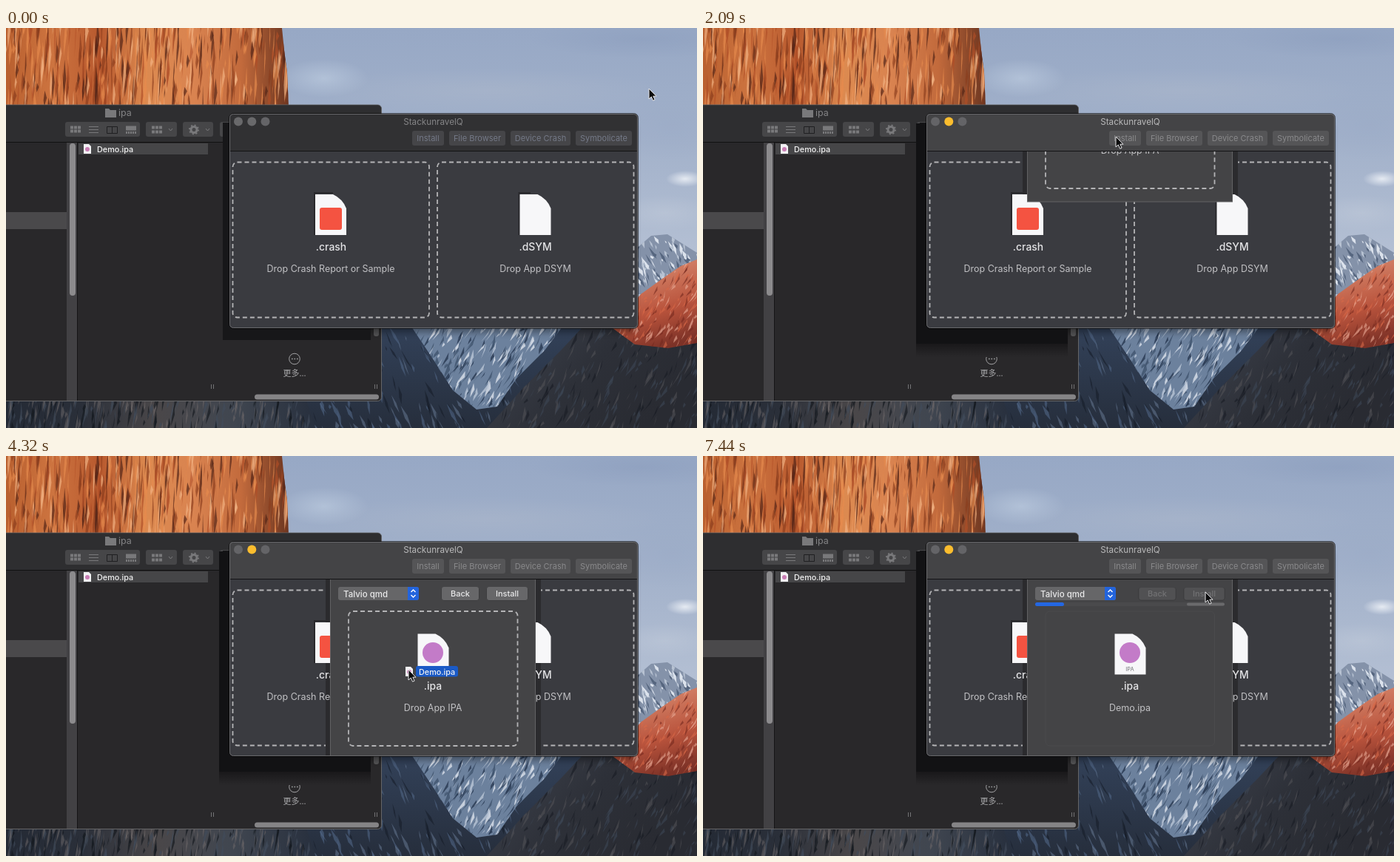
These frames come from a looping animation (934 by 541 pixels, 8000 ms). An HTML page with a canvas:

```html
<!DOCTYPE html>
<html lang="en">
<head>
<meta charset="utf-8">
<title>Install an app package</title>
<style>
html, body { margin: 0; width: 100%; height: 100%; overflow: hidden; background: #2b3444; }
canvas, svg { position: absolute; left: 0; top: 0; width: 934px; height: 541px; }
text { font: 400 12.5px Inter, "Noto Sans", sans-serif; fill: #c0c0c3; }
.mid { text-anchor: middle; }
.name { font-size: 13.9px; font-weight: 500; fill: #e4e4e6; }
.file { font-size: 10.8px; font-weight: 500; fill: #f2f2f2; }
.small { font-size: 11px; font-weight: 500; fill: #e9e9ea; }
.dash { fill: none; stroke: #b4b4b6; stroke-width: 1.8; stroke-dasharray: 6 4; }
.paper { fill: #f7f7f9; }
.segment { fill: #464648; }

/* One clock for everything: 8 s, hard steps, 1% = 80 ms */
.anim, .bar rect, .bar text { animation: 8s step-end infinite; }
.bar rect { fill: #454548; animation-name: button; }
.bar rect.press { animation-name: press; }
.bar text { font-size: 11px; fill: #747987; animation-name: label; }
.title { font-size: 11.7px; fill: #858587; animation-name: title; }
.head { fill: #313133; animation-name: head; }
.red { fill: #69696b; animation-name: red; }
.yellow { fill: #69696b; animation-name: yellow; }
.focus { opacity: 0; animation-name: focus; }
.sheet { transform: translateY(-245px); animation-name: sheet; }
.ring { opacity: 0; animation-name: ring; }
.ghost { opacity: 0; animation-name: ghost; }
.empty { animation-name: empty; }
.loaded { opacity: 0; animation-name: loaded; }
.work { opacity: 0; animation-name: work; }
.ready { animation-name: ready; }
.fill { width: 0; animation-name: fill; }
.cursor { animation-name: cursor; }

@keyframes button { 20.5% { fill: #656567; } 26.125% { fill: #555557; } }
@keyframes press { 20.5% { fill: #656567; } 22.375% { fill: #858587; } 26.125% { fill: #555557; } }
@keyframes label { 20.5% { fill: #e4e4e5; } 26.125% { fill: #89898b; } }
@keyframes title { 20.5% { fill: #b9b9ba; } }
@keyframes head { 20.5% { fill: #3f3f41; } 26.125% { fill: #444446; } }
@keyframes red { 20.5% { fill: #fb5b50; } 26.125% { fill: #646467; } }
@keyframes yellow { 20.5% { fill: #fbbd2e; } }
@keyframes focus { 20.5% { opacity: 1; } }
@keyframes sheet {
  26.125% { transform: translateY(-175px); }
  28% { transform: translateY(-60px); }
  29.75% { transform: none; }
}
@keyframes ring { 44.75% { opacity: 1; } 50.25% { opacity: 0; } }
@keyframes ghost {
  44.75% { opacity: 1; transform: none; }
  50.25% { opacity: 1; transform: translate(284px, 50px); }
  52% { opacity: 1; transform: translate(358px, 94px); }
  53.875% { opacity: 1; transform: translate(408px, 124px); }
  55.75% { opacity: 1; transform: translate(432px, 135px); }
  57.625% { opacity: 0; }
}
@keyframes empty { 57.625% { opacity: 0; } }
@keyframes loaded { 57.625% { opacity: 1; } }
@keyframes work { 83.75% { opacity: 1; } }
@keyframes ready { 83.75% { opacity: .25; } }
@keyframes fill {
  85.5% { width: 8px; }
  87.375% { width: 16px; }
  89.25% { width: 24px; }
  91.125% { width: 32px; }
  93% { width: 39px; }
}
@keyframes cursor {
  0% { transform: translate(869px, 82px); }
  1.875% { transform: translate(868px, 84px); }
  3.75% { transform: translate(865px, 88px); }
  7.5% { transform: translate(822px, 105px); }
  9.25% { transform: translate(722px, 126px); }
  11.125% { transform: translate(608px, 142px); }
  13% { transform: translate(541px, 147px); }
  14.875% { transform: translate(541px, 149px); }
  16.75% { transform: translate(550px, 148px); }
  18.625% { transform: translate(558px, 147px); }
  33.5% { transform: translate(536px, 150px); }
  35.25% { transform: translate(430px, 158px); }
  37.125% { transform: translate(290px, 162px); }
  39.125% { transform: translate(182px, 164px); }
  41% { transform: translate(140px, 163px); }
  44.75% { transform: translate(136px, 165px); }
  46.625% { transform: translate(343px, 178px); }
  50.25% { transform: translate(420px, 215px); }
  52% { transform: translate(494px, 259px); }
  53.875% { transform: translate(544px, 289px); }
  55.75% { transform: translate(568px, 300px); }
  57.625% { transform: translate(572px, 300px); }
  59.5% { transform: translate(610px, 284px); }
  63.25% { transform: translate(685px, 229px); }
  65% { transform: translate(687px, 216px); }
  66.875% { transform: translate(685px, 202px); }
  68.75% { transform: translate(682px, 191px); }
  70.625% { transform: translate(679px, 184px); }
}
</style>
</head>
<body>
<canvas width="934" height="541"></canvas>
<svg viewBox="0 0 934 541">
  <defs>
    <path id="paper" class="paper" d="M0 0H24Q37 6 42 19V55H0Z"/>
    <g id="file">
      <path fill="#f2f2f4" d="M0 0H7L10 3V13H0Z"/>
      <circle cx="5" cy="7" r="3" fill="#c87db4"/>
    </g>
    <clipPath id="body"><rect x="302" y="167" width="552" height="238"/></clipPath>
    <clipPath id="back"><rect x="0" y="128" width="507" height="375"/></clipPath>
    <filter id="soft" x="-10%" y="-10%" width="120%" height="130%"><feGaussianBlur stdDeviation="4"/></filter>
    <linearGradient id="fade" x1="0" y1="0" x2="0" y2="1">
      <stop stop-color="#19181a"/><stop offset="1" stop-color="#29282a"/>
    </linearGradient>
  </defs>

  <!-- file window -->
  <rect x="-8" y="104" width="515.5" height="400.5" rx="5" fill="#29282a" stroke="#656567"/>
  <path d="M0 104.5H502Q507 104.5 507 110V154H0Z" fill="#2e2e30"/>
  <path d="M0 154.5H507" stroke="#111"/>
  <path d="M134 109h5l2 2h8v10h-15Z" fill="#79797b"/>
  <text x="152" y="119" font-size="12" style="fill:#838385">ipa</text>
  <g class="segment">
    <rect x="80" y="127" width="101" height="20" rx="3"/>
    <rect x="189" y="127" width="42" height="20" rx="3"/>
    <rect x="239" y="127" width="41" height="20" rx="3"/>
    <rect x="289" y="127" width="20" height="20" rx="3"/>
  </g>
  <g fill="none" stroke="#79797b">
    <path d="M87 134.5h14M87 139.5h14" stroke-width="4" stroke-dasharray="4 1"/>
    <path d="M112 133.5h13M112 137.5h13M112 141.5h13"/>
    <path d="M136.5 133.500h14v9h-14zM143.500 133v9" stroke="#1f1f21"/>
    <path d="M162 135.500h14" stroke-width="6"/>
    <path d="M162 141.500h14" stroke-width="3" stroke-dasharray="2 1"/>
    <path d="M197 134.500h14M197 140.500h14" stroke-width="4" stroke-dasharray="4 1"/>
    <path d="M220 136l2.500 3 2.500-3M270 136l2.500 3 2.500-3"/>
    <circle cx="254" cy="137.500" r="4" stroke-width="3"/>
    <circle cx="254" cy="137.500" r="6" stroke-width="2" stroke-dasharray="2 2.700"/>
  </g>
  <rect y="249" width="82" height="23" fill="#4a494b"/>
  <rect x="82" y="155" width="14" height="349" fill="#424144"/>
  <rect x="86" y="156" width="8" height="206" rx="4" fill="#8c8b8d"/>
  <path d="M96.500 155V504" stroke="#151516"/>
  <rect x="98" y="156" width="175" height="15" fill="#464648"/>
  <use href="#file" x="105" y="157"/>
  <text x="123" y="168" class="file">Demo.ipa</text>
  <rect class="anim ring" x="97.500" y="155.500" width="174" height="336" fill="none" stroke="#40709f" stroke-width="1.300"/>
  <g fill="none" stroke="#a2a2a4">
    <circle cx="390" cy="447.500" r="7.300"/>
    <path d="M386 447.500h9" stroke-width="1.500" stroke-dasharray="1.600 1.900"/>
    <path d="M277.500 482v6M280.500 482v6M498.500 482v6M501.500 482v6" stroke="#737375"/>
  </g>
  <text x="390" y="471" class="mid" style="font:11px 'Noto Sans CJK SC','Noto Sans CJK',sans-serif;fill:#a5a5a7">更多...</text>
  <rect x="336" y="495.500" width="168" height="7" rx="3.500" fill="#858486"/>
  <rect x="497" y="390" width="7" height="27" rx="3" fill="#555557"/>

  <!-- window shadow -->
  <rect x="306" y="130" width="544" height="282" rx="6" fill="#000" opacity=".35" filter="url(#soft)"/>
  <g clip-path="url(#back)">
    <rect x="293" y="128" width="200" height="294" fill="#171719"/>
    <g class="anim focus">
      <rect x="288" y="427" width="205" height="18" fill="url(#fade)"/>
      <rect x="288" y="129" width="205" height="298" fill="#121214"/>
    </g>
  </g>

  <!-- main window -->
  <rect x="301.500" y="115.500" width="553" height="291" rx="6" fill="none" stroke="#000" stroke-opacity=".6"/>
  <rect x="302" y="116" width="552" height="290" rx="5" fill="#3a3b40"/>
  <path class="anim head" d="M302 166V121Q302 116 307 116H849Q854 116 854 121V166Z"/>
  <path d="M302 166.500H854" stroke="#131315"/>
  <circle class="anim red" cx="314" cy="126.500" r="6"/>
  <circle class="anim yellow" cx="332.300" cy="126.500" r="6"/>
  <circle cx="350.500" cy="126.500" r="6" fill="#646467"/>
  <text class="anim title mid" x="577.500" y="131">StackunravelQ</text>
  <g class="bar mid">
    <rect class="press" x="549" y="139" width="43" height="20" rx="3"/><text x="570.500" y="153">Install</text>
    <rect x="599" y="139" width="76" height="20" rx="3"/><text x="637" y="153">File Browser</text>
    <rect x="682" y="139" width="81" height="20" rx="3"/><text x="722.500" y="153">Device Crash</text>
    <rect x="770" y="139" width="76" height="20" rx="3"/><text x="808" y="153">Symbolicate</text>
  </g>
  <rect class="dash" x="306.500" y="181.500" width="265.500" height="210" rx="6"/>
  <rect class="dash" x="583" y="181.500" width="265.500" height="210" rx="6"/>
  <!-- the sheet's shadow lies below the icons and labels -->
  <g clip-path="url(#body)">
    <rect class="anim sheet" x="432" y="167" width="291" height="239" fill="#2b2b2e"/>
  </g>
  <path d="M417 280V223H442M693.500 280V223H709" fill="none" stroke="#29292c" stroke-width="2"/>
  <use href="#paper" x="418" y="225"/>
  <rect x="424" y="243" width="30" height="30" rx="3" fill="#f45341"/>
  <use href="#paper" x="694.500" y="225"/>
  <g class="mid">
    <text x="439.500" y="301" class="name">.crash</text>
    <text x="439" y="329.500">Drop Crash Report or Sample</text>
    <text x="715.500" y="301" class="name">.dSYM</text>
    <text x="715.500" y="329.500">Drop App DSYM</text>
  </g>

  <!-- install sheet -->
  <g clip-path="url(#body)">
    <g class="anim sheet">
      <rect x="438.500" y="160" width="277" height="250" fill="#444446" stroke="#626264"/>
      <rect x="449" y="177" width="109" height="18" rx="3" fill="#666668"/>
      <path d="M543 177h12q3 0 3 3v12q0 3-3 3h-12z" fill="#2364dc"/>
      <path d="M547.500 184l3-3 3 3M547.500 188l3 3 3-3" fill="none" stroke="#fff" stroke-width="1.400"/>
      <text x="456" y="190.500" class="small" style="font-size:11.500px">Talvio qmd</text>
      <rect x="589" y="177.500" width="50" height="17.500" rx="3" fill="#4a4a4c" stroke="#363638"/>
      <rect x="650" y="177.500" width="55" height="17.500" rx="3" fill="#4a4a4c" stroke="#363638"/>
      <g class="anim ready mid">
        <rect x="589" y="177" width="50" height="18" rx="3" fill="#676769"/>
        <rect x="650" y="177" width="55" height="18" rx="3" fill="#676769"/>
        <text x="614" y="190" class="small">Back</text>
        <text x="677.500" y="190" class="small">Install</text>
      </g>
      <rect class="anim empty dash" x="463" y="210" width="228.500" height="182" rx="6"/>
      <rect class="anim loaded" x="463" y="210" width="228.500" height="182" rx="6" fill="none" stroke="#4b4b4d"/>
      <use href="#paper" x="556.500" y="240.500"/>
      <circle cx="577" cy="266" r="14" fill="#c37bc8"/>
      <g class="mid">
        <text x="577" y="291" style="font-size:7.500px;fill:#747478">IPA</text>
        <text x="577" y="316" class="name">.ipa</text>
        <text x="577" y="344.500" class="anim empty">Drop App IPA</text>
        <text x="577" y="344.500" class="anim loaded">Demo.ipa</text>
      </g>
      <g class="anim work">
        <rect x="449" y="198" width="256" height="5" rx="2.500" fill="#4a4a4c"/>
        <rect x="654" y="198.500" width="51" height="4" rx="2" fill="#6a6a6c"/>
        <rect class="anim fill" x="449" y="198" height="5" rx="2.500" fill="#2467e2"/>
      </g>
    </g>
  </g>
  <rect x="302.500" y="116.500" width="551" height="289" rx="5" fill="none" stroke="#69696c"/>

  <g class="anim ghost">
    <use href="#file" x="132" y="161"/>
    <rect x="146" y="160" width="57" height="14.500" rx="3" fill="#1a5ac6"/>
    <text x="150" y="171.500" class="file">Demo.ipa</text>
  </g>
  <path class="anim cursor" d="M0 0V14L3.300 11 5.600 16.200 8.100 15.100 5.800 10.200H10Z" fill="#0c0c0d" stroke="#e6e6e8" stroke-width="1"/>
</svg>
<script>
const ctx = document.querySelector('canvas').getContext('2d');
let seed = 11;
const rand = (lo, hi) => {
  seed = (seed * 16807) % 2147483647;
  return lo + (hi - lo) * seed / 2147483647;
};
const pick = list => list[Math.floor(rand(0, list.length))];

function trace(pts) {
  ctx.beginPath();
  for (let i = 0; i < pts.length; i += 2) ctx.lineTo(pts[i], pts[i + 1]);
  ctx.closePath();
}
function poly(color, ...pts) {
  trace(pts);
  ctx.fillStyle = color;
  ctx.fill();
}
function ramp(x0, y0, x1, y1, ...colors) {
  const g = ctx.createLinearGradient(x0, y0, x1, y1);
  colors.forEach((c, i) => g.addColorStop(i / (colors.length - 1), c));
  return g;
}
function cloud(x, y, rx, ry, rgb, alpha) {
  ctx.save();
  ctx.translate(x, y);
  ctx.scale(rx, ry);
  const g = ctx.createRadialGradient(0, 0, 0, 0, 0, 1);
  g.addColorStop(0, `rgba(${rgb},${alpha})`);
  g.addColorStop(1, `rgba(${rgb},0)`);
  ctx.fillStyle = g;
  ctx.fillRect(-1, -1, 2, 2);
  ctx.restore();
}
// Tapered strokes scattered inside a polygon
function slivers(n, colors, box, w, h, lean, pts) {
  const [x0, y0, x1, y1] = box;
  ctx.save();
  trace(pts);
  ctx.clip();
  for (let i = 0; i < n; i++) {
    const x = rand(x0, x1), y = rand(y0, y1), a = rand(.6, w), b = rand(h / 5, h);
    const dx = lean * b * rand(.2, 1);
    poly(pick(colors), x, y, x + a + dx * .4, y + b * .45, x + dx, y + b, x - a * .4 + dx * .5, y + b * .6);
  }
  ctx.restore();
}

// sky
poly(ramp(0, 0, 0, 300, '#97a8c5', '#a2b1ca', '#b3bfd3'), 0, 0, 934, 0, 934, 541, 0, 541);
cloud(430, 68, 60, 26, '187,202,222', .7);
cloud(650, 85, 240, 30, '173,184,203', .5);
cloud(860, 15, 150, 26, '138,156,188', .5);
cloud(900, 130, 90, 50, '154,170,198', .5);
cloud(918, 204, 26, 11, '236,240,246', .9);
cloud(890, 250, 70, 24, '190,200,216', .6);

// cliff
const cliff = [0, 0, 373, 0, 376, 30, 380, 60, 382, 106, 0, 106];
poly(ramp(0, 0, 382, 0, '#b9602f', '#cd7440', '#b8592e', '#dc8a50', '#d98350', '#c26a3c', '#6b3520'), ...cliff);
slivers(520, ['#8b3d1daa', '#4f2216aa', '#f3b584aa', '#e88c4faa', '#b04f27aa'], [0, -40, 382, 100], 3.5, 60, -.06, cliff);

// far ridge
const far = [850, 300, 872, 281, 894, 279, 934, 304, 934, 360, 850, 360];
poly('#8492a9', ...far);
slivers(90, ['#dbe2ec', '#56667f', '#b7c2d2'], [850, 278, 934, 340], 4, 18, .7, far);

// lower mountains
poly(ramp(0, 400, 0, 541, '#33425a', '#262e3c'), 400, 395, 934, 395, 934, 541, 400, 541);
slivers(170, ['#51678699', '#161d2999', '#71839e77'], [400, 400, 690, 541], 4, 30, .7,
  [507, 395, 760, 395, 690, 541, 400, 541]);
const snow = [548, 404, 752, 404, 728, 436, 690, 474, 664, 512, 636, 516, 604, 490, 580, 452];
poly('#6c819d', ...snow);
slivers(380, ['#dce3edcc', '#40546fcc', '#b8c5d6cc', '#273750cc'], [545, 390, 790, 510], 4.5, 26, -.8, snow);
const slope = [650, 541, 700, 486, 750, 436, 780, 404, 934, 404, 934, 541];
poly(ramp(700, 400, 860, 541, '#3b3f49', '#2d3038', '#292b32'), ...slope);
slivers(280, ['#181b2399', '#50515699', '#3c465699'], [670, 395, 960, 535], 4, 28, -.7, slope);

// sunlit ridge
const ridge = [820, 406, 858, 360, 890, 337, 912, 322, 934, 313, 934, 426, 895, 433, 850, 428];
poly(ramp(860, 340, 890, 432, '#cf7a60', '#b9533c', '#7d3227'), ...ridge);
slivers(230, ['#eaab9699', '#75291f99', '#d9694999'], [825, 310, 950, 425], 3.5, 18, -.8, ridge);

// bottom left rock
const foot = [0, 500, 405, 500, 418, 541, 0, 541];
poly(ramp(0, 0, 410, 0, '#242a35', '#2a2f39', '#4a4749', '#404650', '#29313f'), ...foot);
slivers(260, ['#14181faa', '#756e6d77', '#414b5aaa'], [0, 485, 410, 535], 3.5, 36, -.2, foot);
</script>
</body>
</html>
```
